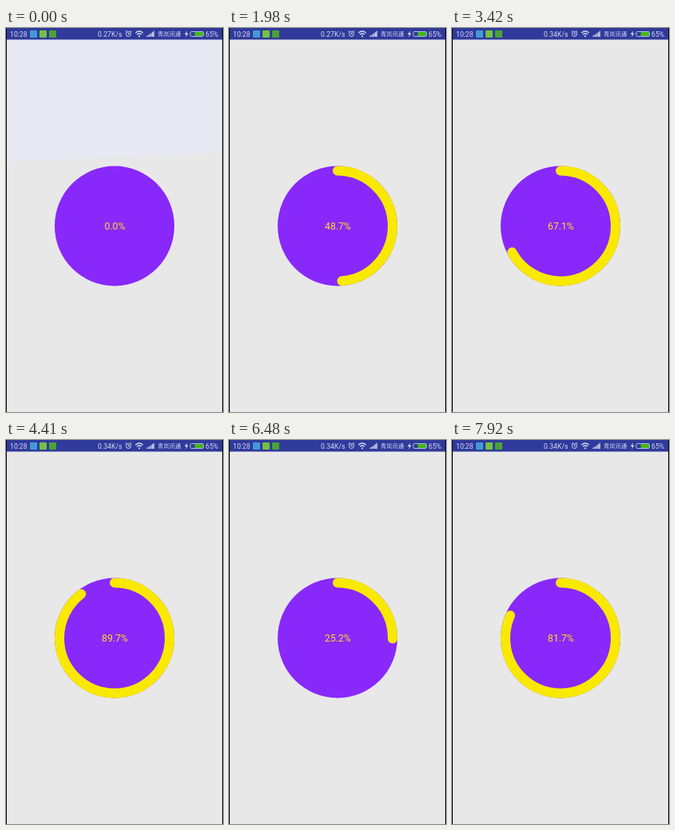
These frames come from a looping animation (272x480 px, 8.01 s). An HTML page:

```html
<!DOCTYPE html>
<html lang="zh">
<head>
<meta charset="utf-8">
<title>Progress ring</title>
<style>
  html, body { margin: 0; width: 100%; height: 100%; overflow: hidden; background: #e8e8e8; }
  svg { display: block; font-family: Roboto, Inter, sans-serif; }
  .status { font-size: 8.7px; fill: #d5d9f0; }
  .line { fill: none; stroke: #d5d9f0; }
</style>
</head>
<body>
<svg width="272" height="480" viewBox="0 0 272 480">
  <rect width="272" height="480" fill="#e8e8e8"/>
  <path id="tint" d="M0 14H272V156L60 165L0 168Z" fill="#e8e8f2"/>
  <rect width="272" height="14.5" fill="#303a9b"/>

  <g class="status">
    <text x="5" y="10.8">10:28</text>
    <text id="speed" x="115" y="10.8"></text>
    <text x="190" y="10.4" style="font: 7.3px 'Noto Sans CJK SC', 'Noto Sans CJK', sans-serif">青岚讯通</text>
    <text x="250" y="10.8">65%</text>
    <path d="M227 3.5L223.8 8H226L225.2 11.5L228.6 6.7H226.4Z"/>
    <path d="M176.5 11V9.5H178V11ZM178.6 11V8.2H180.1V11ZM180.7 11V6.8H182.2V11ZM182.8 11V5.3H184.3V11ZM184.6 11V3.8H185.8V11Z"/>
    <circle cx="167" cy="10.3" r="1.1"/>
  </g>
  <g class="line">
    <circle cx="153.5" cy="7.5" r="3"/>
    <path d="M153.5 5.8V7.7H155M149.7 5L151.6 3.3M157.3 5L155.4 3.3"/>
    <path d="M162.3 6.2Q167 1.8 171.7 6.2M164.2 8.3Q167 5.8 169.8 8.3" stroke-width="1.3"/>
    <rect x="231" y="4.5" width="16.5" height="6" rx="1.5" stroke-width=".8"/>
  </g>
  <rect x="236.5" y="5" width="10.5" height="5" rx="1" fill="#43b51c"/>
  <rect x="30" y="3" width="9" height="9" rx="1" fill="#4399d8"/>
  <rect x="42" y="3" width="9" height="9" rx="1" fill="#75c044"/>
  <rect x="54" y="3" width="9" height="9" rx="1" fill="#4ca038"/>
  <path d="M.5 0V480M271.5 0V480" stroke="#080808"/>

  <circle cx="136" cy="247.5" r="75" fill="#8928fb"/>
  <path id="arc" d="M136 178.5A69 69 0 0 1 136 316.5A69 69 0 0 1 136 178.5" pathLength="100"
        fill="none" stroke="#f9e900" stroke-width="12" stroke-linecap="round"/>
  <text id="label" x="136.4" y="252" text-anchor="middle" font-size="12.2" fill="#f9df20"></text>
</svg>
<script>
const LOOP = 8010, STEP = 90;
// [time, progress summed over both turns]
const keys = [[0, 0], [1980, 48.7], [3420, 67.1], [5310, 110.2], [6480, 125.2], [7920, 181.7], [LOOP, 185]];
const get = id => document.getElementById(id);
const [arc, label, speed, tint] = ['arc', 'label', 'speed', 'tint'].map(get);

function progressAt(t) {
  const i = keys.findIndex(k => k[0] > t);
  const [t0, p0] = keys[i - 1], [t1, p1] = keys[i];
  return (p0 + (p1 - p0) * (t - t0) / (t1 - t0)) % 100;
}

function draw(now) {
  const t = Math.floor(now % LOOP / STEP) * STEP;
  const p = progressAt(t);
  arc.style.display = p ? '' : 'none';
  arc.setAttribute('stroke-dasharray', `${p} 200`);
  label.textContent = p.toFixed(1) + '%';
  speed.textContent = t < 2880 ? '0.27K/s' : '0.34K/s';
  tint.style.display = t < STEP ? '' : 'none';
}

const start = performance.now();
function tick() {
  draw(performance.now() - start);
  requestAnimationFrame(tick);
}
tick();
</script>
</body>
</html>
```
